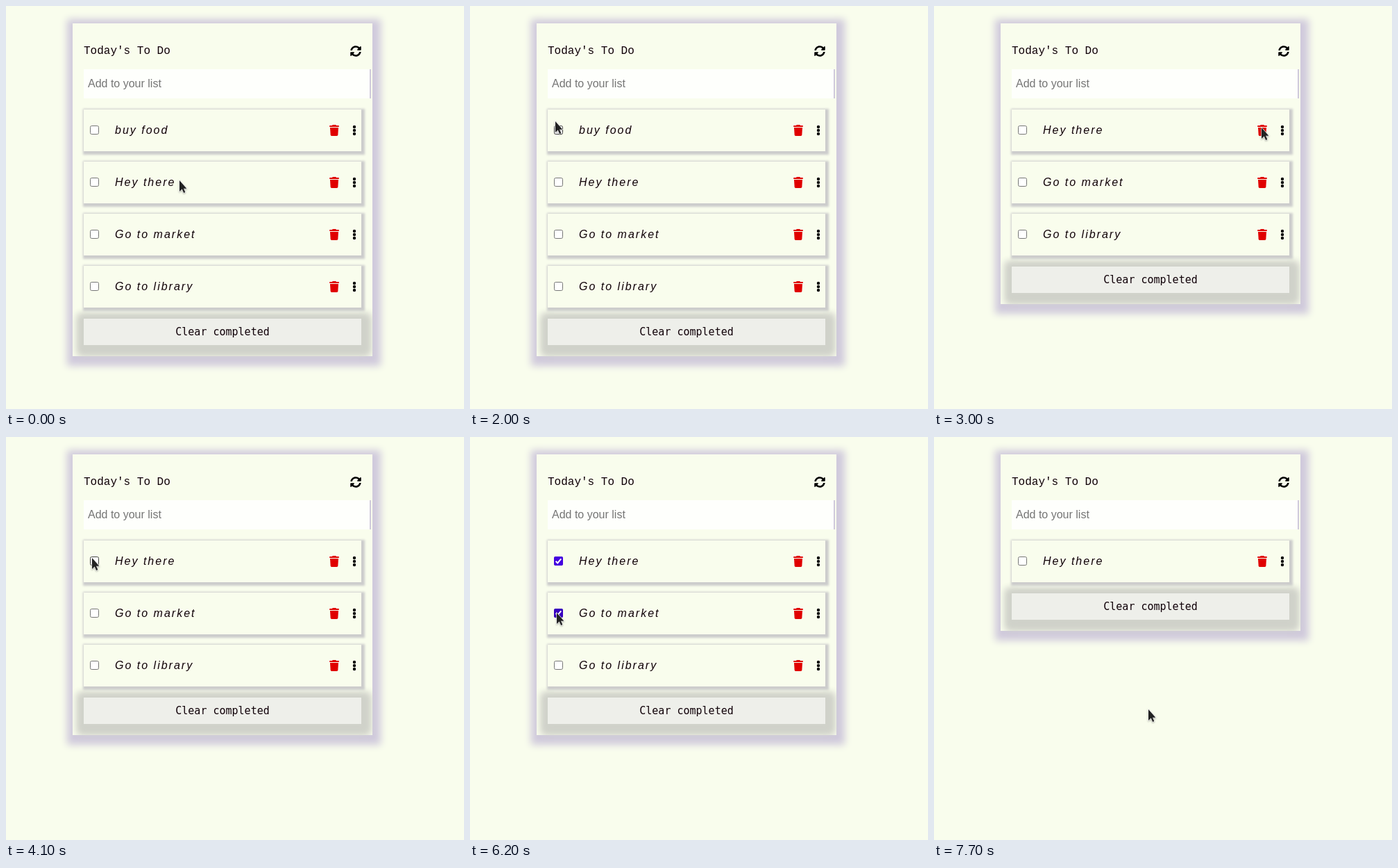
Write an HTML page that moves like this. It is 660 by 580 pixels and loops after 8000 ms.

```html
<!DOCTYPE html>
<html lang="en">
<head>
<meta charset="utf-8">
<title>Today's To Do</title>
<style>
html, body { margin: 0; width: 100%; height: 100%; overflow: hidden; background: #f9fded; }
body { position: relative; color: #100008; }
svg { position: absolute; overflow: visible; }

.card {
  position: absolute; left: 96px; top: 25px; width: 400px; padding: 124px 16px 16px;
  background: #f9fded; box-shadow: 2px 4px 10px 10px #d0cadc;
}
.inner { position: absolute; inset: 0; overflow: hidden; }
.list { position: relative; }
h1 {
  position: absolute; left: 16px; top: 30px; margin: 0;
  font: 16px/20px "Liberation Mono", monospace; white-space: pre;
}
.sync { left: 400px; top: 32px; }
.entry {
  position: absolute; left: 16px; top: 66px; width: 406px; height: 42px; padding-left: 6px;
  border-right: 2px solid #d0cadc; background: #fefffc; color: #757575;
  font: 16px/42px "Liberation Sans", Arial, sans-serif;
}
.item {
  position: relative; height: 60px; margin-bottom: 15px;
  background: #f9fded; box-shadow: 2px 2px 3px 3px #ccc;
  font: italic 16px/60px "Liberation Sans", Arial, sans-serif; letter-spacing: 2px;
}
.item span { position: absolute; left: 45px; white-space: pre; }
.box { left: 9px; top: 23px; }
.trash { left: 354px; top: 22px; fill: #e00000; }
.dots { left: 387px; top: 22px; }
.clear {
  position: relative; height: 38px; margin-top: 16px; background: #eeefea;
  box-shadow: 2px 4px 10px 10px #d0d2ca;
  font: 15px/38px "DejaVu Sans Mono", monospace; text-align: center;
}
.clip { position: absolute; left: 0; right: 0; bottom: 0; height: 80px; padding: 0 16px; overflow: hidden; }
.clip .clear { margin-top: 26px; }
.gap { height: 39px; }

.frame { fill: #fff; stroke: #767676; }
.tick { opacity: 0; }
.tick rect { fill: #4400e0; }
.tick path { fill: none; stroke: #fff; stroke-width: 2; }

.item, .item *, .cursor { animation: 8s step-end infinite; }
.buy { animation-name: removed; }
.market, .library { animation-name: cleared; }
.buy .frame { animation-name: buy-hover; }
.hey .frame { animation-name: hey-hover; }
.market .frame { animation-name: market-hover; }
.hey .tick { animation-name: hey-tick; }
.market .tick { animation-name: market-tick; }
.hey .tick rect { animation-name: hey-fill; }
.market .tick rect { animation-name: market-fill; }
@keyframes removed { 37.5%, to { height: 0; margin: 0; visibility: hidden; } }
@keyframes cleared { 96.25%, to { height: 0; margin: 0; visibility: hidden; } }
@keyframes buy-hover { 25% { stroke: #444; } 30% { stroke: #767676; } }
@keyframes hey-hover { 45% { stroke: #444; } 55% { stroke: #8d8d8d; } 56.25% { stroke: #767676; } }
@keyframes market-hover { 66.25% { stroke: #444; } 72.5% { stroke: #8d8d8d; } 77.5% { stroke: #767676; } }
@keyframes hey-tick { 56.25% { opacity: 1; } 96.25% { opacity: 0; } }
@keyframes market-tick { 77.5%, to { opacity: 1; } }
@keyframes hey-fill { 56.25% { fill: #3800c0; } 62.5% { fill: #4400e0; } }
@keyframes market-fill { 77.5% { fill: #3800c0; } 78.75% { fill: #4400e0; } }

.cursor { left: 0; top: 0; animation-name: roam; filter: drop-shadow(0 1px 1px #0005); }
@keyframes roam {
  0% { transform: translate(250px, 251px); }
  12.5% { transform: translate(250px, 250px); }
  15% { transform: translate(330px, 226px); }
  16.25% { transform: translate(427px, 182px); }
  17.5% { transform: translate(350px, 159px); }
  18.75% { transform: translate(185px, 159px); }
  21.25% { transform: translate(146px, 170px); }
  22.5% { transform: translate(111px, 177px); }
  23.75% { transform: translate(114px, 171px); }
  25% { transform: translate(123px, 166px); }
  27.5% { transform: translate(126px, 175px); }
  30% { transform: translate(170px, 186px); }
  31.25% { transform: translate(300px, 188px); }
  32.5% { transform: translate(440px, 170px); }
  33.75% { transform: translate(472px, 175px); }
  43.75% { transform: translate(350px, 176px); }
  45% { transform: translate(232px, 175px); }
  47.5% { transform: translate(190px, 168px); }
  48.75% { transform: translate(148px, 168px); }
  50% { transform: translate(128px, 172px); }
  51.25% { transform: translate(124px, 174px); }
  61.25% { transform: translate(125px, 181px); }
  62.5% { transform: translate(128px, 196px); }
  63.75% { transform: translate(133px, 214px); }
  65% { transform: translate(137px, 231px); }
  66.25% { transform: translate(137px, 242px); }
  67.5% { transform: translate(135px, 247px); }
  70% { transform: translate(129px, 252px); }
  71.25% { transform: translate(123px, 254px); }
  72.5% { transform: translate(125px, 253px); }
  78.75% { transform: translate(192px, 321px); }
  81.25% { transform: translate(240px, 366px); }
  82.5% { transform: translate(376px, 412px); }
  83.75% { transform: translate(348px, 396px); }
  86.25% { transform: translate(334px, 394px); }
  87.5% { transform: translate(318px, 392px); }
  88.75%, to { transform: translate(309px, 392px); }
}
</style>
</head>
<body>
<svg width="0" height="0">
  <defs>
    <path id="arc" d="M371 133C339 104 299 88 256 88c-77 0-144 53-163 127-1 5-6 9-12 9H24c-7 0-13-7-12-14C34 95 135 8 256 8c66 0 127 26 171 69L463 41C478 26 504 37 504 58V192c0 13-11 24-24 24H346c-21 0-32-26-17-41z"/>
    <path id="can" d="M135 18L128 32H32a32 32 0 0 0 0 64H416a32 32 0 0 0 0-64H320l-7-14C307 7 296 0 284 0H164c-12 0-23 7-29 18zM416 128H32L53 467c2 25 23 45 48 45H347c25 0 46-20 48-45z"/>
    <g id="more"><circle cx="3" cy="3" r="2.2"/><circle cx="3" cy="8" r="2.2"/><circle cx="3" cy="13" r="2.2"/></g>
    <rect id="square" x=".5" y=".5" width="12" height="12" rx="2"/>
  </defs>
</svg>

<div class="card">
  <div class="inner">
    <div class="clip"><div class="clear"></div></div>
  </div>
  <h1>Today's To Do</h1>
  <svg class="sync" width="16" height="16" viewBox="0 0 512 512">
    <use href="#arc"/><use href="#arc" transform="rotate(180 256 256)"/>
  </svg>
  <div class="entry">Add to your list</div>
  <div class="list">
    <div class="item buy">
      <svg class="box" width="13" height="13"><use class="frame" href="#square"/></svg>
      <span>buy food</span>
      <svg class="trash" width="14" height="16" viewBox="0 0 448 512"><use href="#can"/></svg>
      <svg class="dots" width="6" height="16"><use href="#more"/></svg>
    </div>
    <div class="item hey">
      <svg class="box" width="13" height="13"><use class="frame" href="#square"/>
        <g class="tick"><rect width="13" height="13" rx="2"/><path d="M2.6 6.8L5.2 9.4L10.3 3.3"/></g></svg>
      <span>Hey there</span>
      <svg class="trash" width="14" height="16" viewBox="0 0 448 512"><use href="#can"/></svg>
      <svg class="dots" width="6" height="16"><use href="#more"/></svg>
    </div>
    <div class="item market">
      <svg class="box" width="13" height="13"><use class="frame" href="#square"/>
        <g class="tick"><rect width="13" height="13" rx="2"/><path d="M2.6 6.8L5.2 9.4L10.3 3.3"/></g></svg>
      <span>Go to market</span>
      <svg class="trash" width="14" height="16" viewBox="0 0 448 512"><use href="#can"/></svg>
      <svg class="dots" width="6" height="16"><use href="#more"/></svg>
    </div>
    <div class="item library">
      <svg class="box" width="13" height="13"><use class="frame" href="#square"/></svg>
      <span>Go to library</span>
      <svg class="trash" width="14" height="16" viewBox="0 0 448 512"><use href="#can"/></svg>
      <svg class="dots" width="6" height="16"><use href="#more"/></svg>
    </div>
    <div class="clear">Clear completed</div>
  </div>
</div>

<svg class="cursor" width="12" height="20">
  <path d="M0 0V16L3.7 12.6L6.1 18L8.4 17L6 11.7H10.4Z" fill="#222" stroke="#fff" stroke-width="1.2" paint-order="stroke"/>
</svg>
</body>
</html>
```
